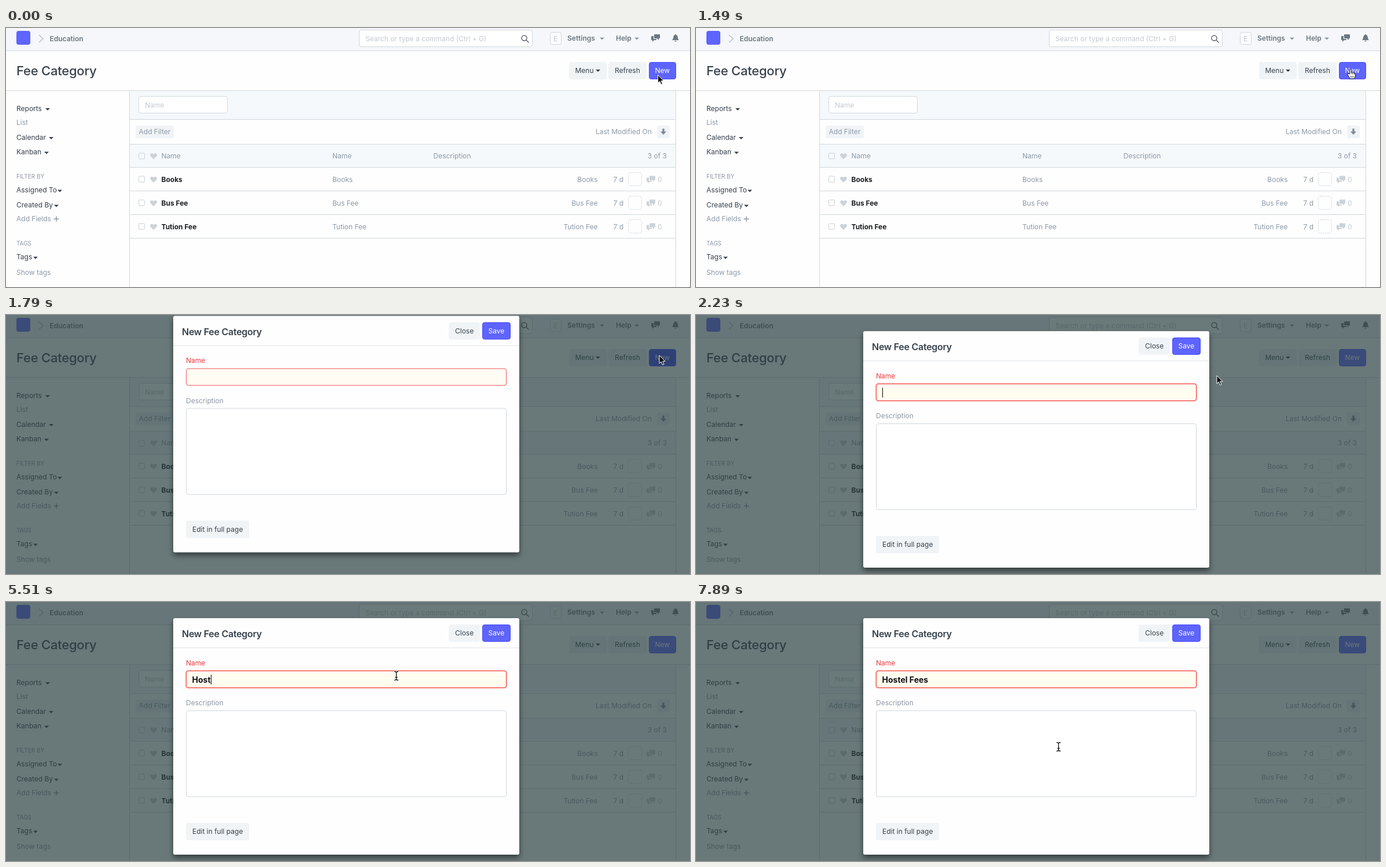
Write an HTML page that moves like this. It is 1182 px wide and 449 px high and loops after 8 s.

```html
<!DOCTYPE html>
<html lang="en">
<head>
<meta charset="utf-8">
<title>New fee category</title>
<style>
  html, body { margin: 0; width: 100%; height: 100%; overflow: hidden; background: #fefefe; }
  svg { display: block; }
  text { font: 12px Inter, "Open Sans", sans-serif; fill: #8d99a6; white-space: pre; }
  .dark { fill: #36414c; }
  .nav { fill: #6c7680; font-weight: 600; }
  .bold { fill: #1b1e21; font-weight: 700; }
  .pale { fill: #c3cad1; }
  .white { fill: #fff; }
  .red { fill: #ea3b42; }
  .small { font-size: 10px; }
  .title { font-size: 22px; font-weight: 500; letter-spacing: -.01em; fill: #36414c; }
  .heading { font-size: 16px; font-weight: 600; letter-spacing: -.017em; fill: #36414c; }
  .entry { font-size: 14px; font-weight: 700; fill: #111; }
  .end { text-anchor: end; }
  #panel { filter: drop-shadow(0 5px 5px rgba(0, 0, 0, .5)); }
</style>
</head>
<body>
<svg id="stage" width="1182" height="449" viewBox="0 0 1182 449"></svg>
<script>
const LINE = '#d1d8dd', SOFT = '#f0f4f7', BLUE = '#5e64ff', TINT = '#f5f9fc';

// y is the middle of the capitals
const text = (x, y, s, cls = '', rise = 4.4) => `<text x="${x}" y="${y + rise}" class="${cls}">${s}</text>`;
const fill = (x, y, w, h, color, r = 0) => `<rect x="${x}" y="${y}" width="${w}" height="${h}" rx="${r}" fill="${color}"/>`;
const box = (x, y, w, h, color = 'none', r = 3.5, stroke = LINE, more = '') =>
  `<rect x="${x + .5}" y="${y + .5}" width="${w - 1}" height="${h - 1}" rx="${r}" fill="${color}" stroke="${stroke}" ${more}/>`;
const path = (x, y, d, color, more = '') => `<path transform="translate(${x} ${y})" d="${d}" fill="${color}" ${more}/>`;
const stroke = (x, y, d, color, width) => path(x, y, d, 'none', `stroke="${color}" stroke-width="${width}"`);
const hline = (y, x = 213, w = 945) => fill(x, y, w, 1, LINE);
const caret = (x, y, color = '#36414c') => path(x, y, 'M-4-2h8l-4 4z', color);
const heart = y => path(255, y, 'M0 5.5L-5 .5C-8-3-3-7 0-3C3-7 8-3 5 .5Z', '#cbd2d8');
const check = y => box(229, y - 5, 11, 11, 'none', 1.5, '#c8d0d6');
const chat = (x, y, color) => path(x, y,
  'M5-6H15V1H13V4L10 1H5Z M0-3H4V2H9V4H5L2 7V4H0Z', color);

function navbar() {
  return fill(0, 0, 1182, 39, '#f5f7fa') + hline(39, 0, 1182) +
    fill(18, 5, 24, 24, BLUE, 4) +
    stroke(57, 12, 'M0 0L7 6.5L0 13', '#b8c2cc', 1.5) +
    text(75.5, 18.5, 'Education', 'nav') +
    box(610, 3, 300, 30, '#fff') + text(621, 18.5, 'Search or type a command (Ctrl + G)', 'pale') +
    stroke(896, 17.5, 'M4 0A4.5 4.5 0 1 1-5 0A4.5 4.5 0 1 1 4 0M3 3.5L7.5 8', '#5d6770', 1.5) +
    box(940, 7, 20, 22, '#fafbfc', 3) + text(946, 18.5, 'E', 'pale') +
    text(970, 18, 'Settings', 'nav') + caret(1030, 18.5, '#8d99a6') +
    text(1054, 18, 'Help', 'nav') + caret(1090, 18.5, '#8d99a6') +
    chat(1115, 17, '#6c7680') +
    path(1157, 17, 'M-6 4C-3 2-5-4-1-5V-6H1V-5C5-4 3 2 6 4ZM-2 5H2Q0 8-2 5Z', '#6c7680');
}

function header() {
  return text(18, 74, 'Fee Category', 'title', 8) +
    fill(973, 59, 65, 30, SOFT, 4) + text(983.5, 74, 'Menu', 'dark') + caret(1023, 74) +
    fill(1041, 59, 66, 30, SOFT, 4) + text(1052, 74, 'Refresh', 'dark') +
    `<g id="newButton">${box(1111, 59, 47, 30, 'inherit', 3.5, '#444bff')}</g>` + text(1121.5, 74, 'New', 'white') +
    hline(108, 0, 1182);
}

function sidebar() {
  const menus = [['Reports', 139.5, 72], ['Calendar', 189.5, 78], ['Kanban', 215, 70],
    ['Assigned To', 281, 93], ['Created By', 307, 87], ['Tags', 397, 51]];
  return menus.map(([s, y, x]) => text(18, y, s, 'dark') + caret(x, y + 1.5)).join('') +
    text(18, 163.5, 'List') + text(18, 331, 'Add Fields') + text(18, 423.5, 'Show tags') +
    stroke(87, 331, 'M-4.5 0h9M0-4.5v9', '#8d99a6', 1.5) +
    text(18, 257.5, 'FILTER BY', 'small', 3.6) + text(18, 373.5, 'TAGS', 'small', 3.6);
}

function row(name, i) {
  const y = 262.5 + 41 * i;
  return check(y - 1) + heart(y) + text(268.5, y, name, 'bold') + text(564, y, name) +
    text(1022.5, y, name, 'end') + text(1049.5, y, '7 d') +
    box(1075, y - 12.5, 24, 24, 'none', 3.5, LINE, 'stroke-dasharray="2.5 1.5"') +
    chat(1107, y, '#cbd2d8') + text(1126, y, '0', 'pale') + hline(y + 19.5);
}

function list() {
  return fill(214, 109, 943, 49, TINT) + fill(214, 202, 943, 39, TINT) +
    fill(213, 109, 1, 340, LINE) + fill(1157, 109, 1, 340, LINE) +
    [158, 201, 241].map(y => hline(y)).join('') +
    box(229, 118, 154, 30, '#fff') + text(240, 133.5, 'Name', 'pale') +
    fill(224, 169, 66, 22, SOFT, 3) + text(229.5, 180, 'Add Filter') +
    text(1019, 180, 'Last Modified On') + fill(1125, 169, 22, 22, SOFT, 3) +
    path(1136, 180, 'M-1.7-5.5H1.7V-.5H5.2L0 5L-5.2-.5H-1.7Z', '#7f8b97') +
    check(221.5) + heart(222) + text(268.5, 222, 'Name') + text(564, 222, 'Name') +
    text(738.5, 222, 'Description') + text(1142, 222, '3 of 3', 'end') +
    ['Books', 'Bus Fee', 'Tution Fee'].map(row).join('');
}

function form() {
  return text(304, 55.5, 'New Fee Category', 'heading', 5.8) + fill(289, 79, 598, 1, '#dfe4e8') +
    fill(765, 39, 54, 30, SOFT, 4) + text(776, 54, 'Close', 'dark') +
    box(823, 39, 49, 30, BLUE, 3.5, '#444bff') + text(833.5, 54, 'Save', 'white') +
    text(311, 105.5, 'Name', 'red') + box(311, 119, 554, 30, '#fffcf3', 3.5, '#f0545a') +
    text(311, 175, 'Description') + box(311, 188, 554, 150, '#fff') +
    fill(311, 383, 109, 30, SOFT, 3) + text(322, 398, 'Edit in full page', 'dark');
}

const cursors = {
  arrow: path(0, 0, 'M0 0V14L3.2 11L5.6 16.5L8 15.5L5.7 10.2H10Z', '#111', 'stroke="#fff"'),
  hand: path(0, 0, 'M4 9V2Q4 0 5.2 0Q6.6 0 6.6 2V6Q9 5 9.2 6.5Q11.5 5.8 11.8 7.5Q14 7 14 9V12L12 17H5L1 11Q-1 8 1.5 8Z',
    '#fff', 'stroke="#111"') + stroke(0, 0, 'M6.6 6V9M9.2 7V9.5M11.8 8V10M6 12V15M8.3 12V15M10.5 12V15', '#111', .8),
  beam: ['#fff', '#111'].map((c, i) =>
    stroke(0, 0, 'M-3.5-7.5Q0-7.5 0-5.5Q0-7.5 3.5-7.5M0-5.5V5.5M-3.5 7.5Q0 7.5 0 5.5Q0 7.5 3.5 7.5M-2 2.5H2', c, i ? 1.3 : 3)).join('')
};

const stage = document.getElementById('stage');
stage.innerHTML = fill(0, 0, 1182, 449, '#fefefe') + navbar() + header() + sidebar() + list() +
  `<rect id="backdrop" width="1182" height="449" fill="rgb(44,64,66)"/>
   <g id="modal"><rect id="panel" x="289" y="28" width="598" height="410" rx="3" fill="#fefefe"/>
     <use id="ghost" href="#form" y="-9" opacity=".15"/><g id="form">${form()}</g>
     <g id="focus">${box(311, 119, 554, 30, 'none', 4, 'rgba(255,80,70,.25)', 'stroke-width="4"')}
       ${box(311, 119, 554, 30, '#fffcf0', 3.5, '#ee3a34')}</g>
     <text id="entry" class="entry" x="321.5" y="139.5"></text>
     <rect id="bar" y="126" width="1" height="17" fill="#000"/></g>` +
  Object.entries(cursors).map(([id, shape]) => `<g id="${id}">${shape}</g>`).join('');

const $ = id => document.getElementById(id);
const show = (id, on) => $(id).style.display = on ? '' : 'none';
const at = (steps, t) => steps.findLast(s => s[0] <= t);

// time, shift, panel opacity, form opacity, backdrop opacity
const opening = [[0, 0, 0, 0, 0], [1640, -84, .78, .32, .155], [1790, -26.5, 1, 1, .7], [1940, 0, 1, 1, .7]];
const pointer = [[0, 'arrow', 1126.5, 81.5], [600, 'hand', 1126, 75], [750, 'hand', 1125.5, 71],
  [1640, 'arrow', 1129, 70], [2090, 'arrow', 1080, 80], [2230, 'arrow', 900, 105],
  [2380, 'beam', 720, 125], [2520, 'beam', 674.5, 128], [7890, 'beam', 626.5, 251]];
const blinks = [[0, 0], [2090, 1], [2520, 0], [2970, 1], [3420, 0], [4020, 1], [4470, 0], [4920, 1], [7750, 0]];
const keyTimes = [5070, 5210, 5360, 5510, 5810, 5960, 6110, 6400, 6550, 6850, 7300];

function draw(now) {
  const t = now % 8000;
  const [, shift, panel, ink, dim] = at(opening, t);
  $('modal').setAttribute('transform', `translate(0 ${shift})`);
  show('modal', panel > 0);
  $('panel').style.opacity = panel;
  $('form').style.opacity = ink;
  $('backdrop').style.opacity = dim;
  show('ghost', ink < 1);
  show('focus', t >= 2090);
  $('newButton').setAttribute('fill', t >= 1640 && t < 2090 ? '#3640f0' : BLUE);
  $('newButton').firstChild.setAttribute('fill', $('newButton').getAttribute('fill'));

  const typed = 'Hostel Fees'.slice(0, keyTimes.filter(k => k <= t).length);
  const entry = $('entry');
  if (entry.textContent !== typed) entry.textContent = typed;
  show('bar', at(blinks, t)[1]);
  $('bar').setAttribute('x', Math.round(322 + (typed ? entry.getComputedTextLength() - .5 : 0)));

  const [, kind, x, y] = at(pointer, t);
  for (const id in cursors) show(id, id === kind);
  $(kind).setAttribute('transform', `translate(${x} ${y})`);
  requestAnimationFrame(draw);
}
requestAnimationFrame(draw);
</script>
</body>
</html>
```
